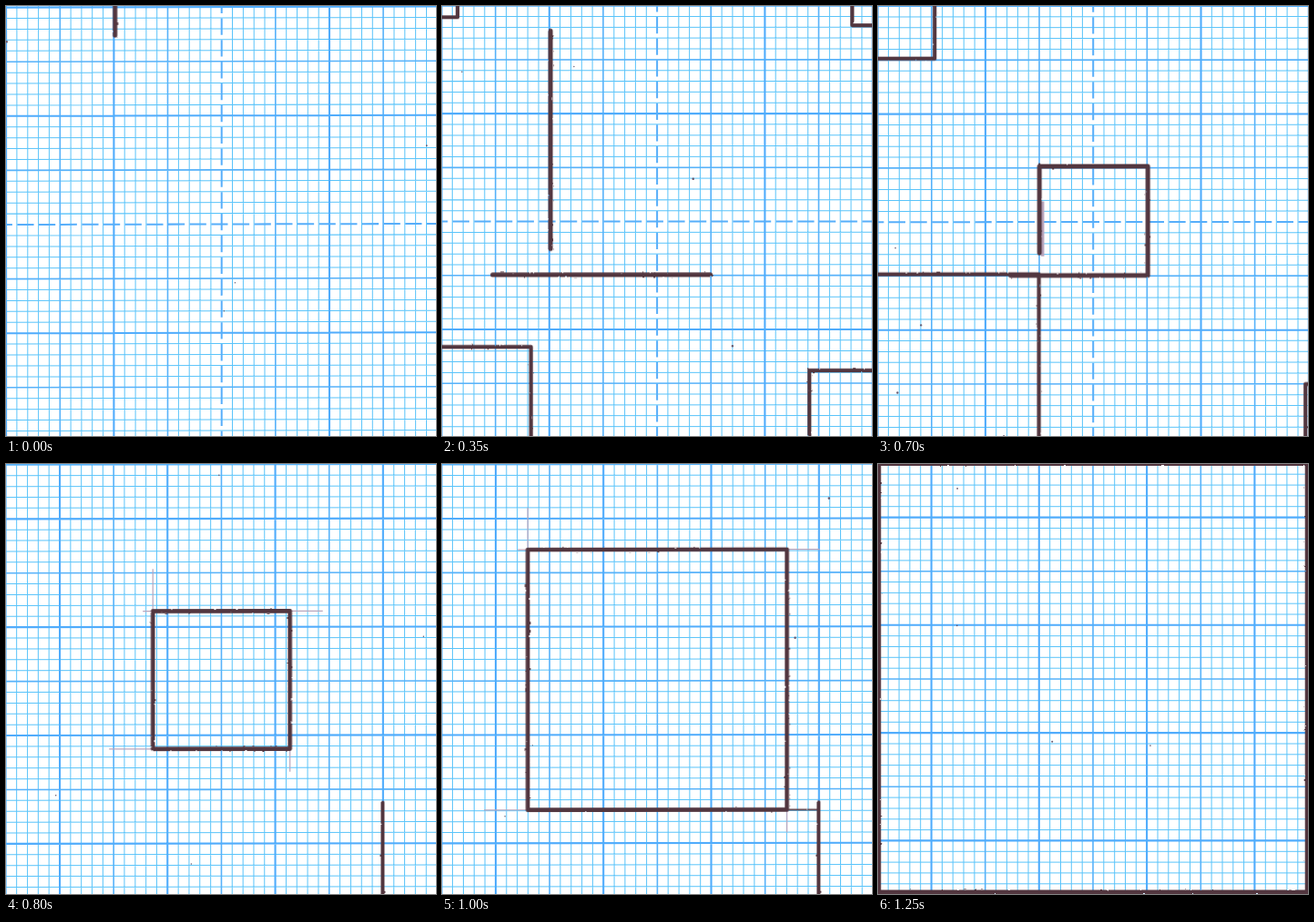
Write an HTML page that moves like this. It is 472x472 px and loops after 1300 ms.

```html
<!DOCTYPE html>
<html lang="en">
<head>
<meta charset="utf-8">
<title>Graph paper squares</title>
<style>
html, body { margin: 0; width: 100%; height: 100%; overflow: hidden; background: #fff; }
svg { display: block; width: 100vw; height: 100vh; }
path { fill: none; }
#ink path { stroke: #52363f; stroke-linecap: round; stroke-linejoin: round; }
#pencil path { stroke: #b9a6bd; }
</style>
</head>
<body>
<svg viewBox="0 0 472 472">
  <defs>
    <filter id="rough" filterUnits="userSpaceOnUse" x="-10" y="-10" width="492" height="492" color-interpolation-filters="sRGB">
      <feTurbulence type="fractalNoise" baseFrequency=".2" numOctaves="2" seed="4"/>
      <feDisplacementMap in="SourceGraphic" scale="2" xChannelSelector="R" yChannelSelector="G"/>
    </filter>
  </defs>
  <rect width="472" height="472" fill="#fff"/>
  <g id="page">
    <g id="dashedPaper"></g>
    <g id="plainPaper"></g>
    <g id="pencil">
      <path id="ghost" stroke-width="3.5"/>
      <path id="guides" stroke-width="1.2"/>
    </g>
    <g id="dust" fill="#66586e"></g>
    <g id="ink" filter="url(#rough)">
      <path id="snakes" stroke-width="5"/>
      <path id="corners" stroke-width="4.2"/>
      <path id="strays" stroke-width="4"/>
      <path id="link" stroke-width="1.8"/>
      <path id="box" stroke-width="4.6"/>
    </g>
  </g>
</svg>
<script>
const $ = id => document.getElementById(id);
const setPath = (id, d) => $(id).setAttribute('d', d);
const CELL = 11.83, LOOP = 1300, MID = 236;
const CLOSED = 14;   // step at which the snakes have closed the square
const LOW = 294.5, HIGH = 175, LEFT = 119, INNER = 177, RIGHT = 296;
const BODY = 239;    // length of one snake

// Piecewise linear value; keys are [step, value].
function at(keys, k) {
  for (let i = 1; i < keys.length; i++) {
    const [a, u] = keys[i - 1], [b, v] = keys[i];
    if (k <= b) return u + (v - u) * (k - a) / (b - a);
  }
  return keys[keys.length - 1][1];
}

function random(seed) {
  return () => {
    seed = (seed * 16807 + 11) % 2147483647;
    return seed / 2147483647;
  };
}

const stroke = (d, color, width, extra = '') =>
  `<path d="${d}" stroke="${color}" stroke-width="${width}" ${extra}/>`;

// Every fifth line is heavier, every tenth heaviest; phase picks which.
function paper(phase, dashed) {
  const d = { thin: '', medium: '', strong: '', dash: '' };
  for (let i = -22; i <= 22; i++) {
    const p = (MID + i * CELL).toFixed(1);
    const kind = dashed && i === 0 ? 'dash'
      : i % 5 ? 'thin'
      : (i + phase) % 10 ? 'medium' : 'strong';
    d[kind] += `M${p} -12V484M-12 ${p}H484`;
  }
  return stroke(d.thin, '#5ac4fa', 1) +
    stroke(d.medium, '#57b2fa', 1.6) +
    stroke(d.strong, '#50acfc', 2.1) +
    stroke(d.dash, '#57aefa', 2, 'stroke-dasharray="18.2 5.46"');
}
$('dashedPaper').innerHTML = paper(0, true);
$('plainPaper').innerHTML = paper(5, false);

// How far the scanned sheet slips and stretches.
const drift = [[0, 1], [6, .15], [10, .6], [13, .3], [17, 1], [21, .1], [24, 0]];

function slip(k) {
  const d = at(drift, k);
  return `matrix(1 ${-.0022 * d} 0 ${1 + .0077 * d} ${.7 * d} ${2.2 * d})`;
}

// Part of a polyline between two distances.
function cut(pts, start, from, to) {
  let s = start, d = '';
  for (let i = 1; i < pts.length; i++) {
    const [x, y] = pts[i - 1], [u, v] = pts[i];
    const len = Math.hypot(u - x, v - y);
    const a = Math.max(from - s, 0) / len, b = Math.min(to - s, len) / len;
    if (a < b) {
      const p = f => `${x + (u - x) * f} ${y + (v - y) * f}`;
      d += (d ? 'L' : 'M' + p(a) + 'L') + p(b);
    }
    s += len;
  }
  return d;
}

// Two snakes share a track: one falls onto it, one comes in from the left.
const turn = [[RIGHT, LOW], [RIGHT, HIGH], [INNER, HIGH], [INNER, LOW]];
const down = [[LEFT, -400], [LEFT, LOW], ...turn];
const across = [[-400, LOW], ...turn];
const acrossStart = LOW - LEFT - 400;
const tailKeys = [[0, -209], [6, 27], [10, 143], [13, 321]];
const headKeys = [[0, 170], [6, 470], [10, 640], [13, 805]];

function drawSnakes(k) {
  const tail = at(tailKeys, k), head = at(headKeys, k);
  const joined = k >= 10;
  let d = '', ghost = '';
  if (k < CLOSED) {
    d = joined ? cut(down, -400, tail, head)
      : cut(down, -400, tail, tail + BODY) + cut(across, acrossStart, head - BODY, head);
    if (joined) ghost = cut(down, -400, head - 60, head);
  }
  setPath('snakes', d);
  setPath('ghost', ghost);
}

// Squares push in from the corners until the peak, then leave.
const PEAK = 10.4;
const corners = [
  { from: [-20, -20], tip: [127, 122], come: [25, 25], go: [-25, -25] },
  { from: [492, -20], tip: [371, 98], come: [-18, 17.5], go: [45, -45] },
  { from: [-20, 492], tip: [146, 193], come: [11, -41], go: [11.7, 38.5] },
  { from: [492, 492], tip: [313, 307], come: [-20.5, -21], go: [60, 41] }
];

function cornerPath({ from, tip, come, go }, k) {
  const dt = k - PEAK, speed = dt < 0 ? come : go;
  const [x, y] = tip.map((p, i) => p + speed[i] * dt);
  return `M${from[0]} ${y}H${x}V${from[1]}`;
}

// The closed square grows; stray lines peek in beside it and withdraw.
function drawBox(k) {
  const n = k - CLOSED;
  if (n < 0) return ['box', 'strays', 'link', 'guides'].forEach(id => setPath(id, ''));
  const half = 59.5 + n * (15.55 + .2 * n);
  const l = MID - half, r = MID + half, t = l - 1.2, b = r - 1.2;
  const away = Math.abs(k - 17), side = 297 + 36 * away;
  setPath('box', `M${l} ${t}H${r}V${b}H${l}Z`);
  setPath('strays', `M413 ${side}V492M297 ${-2.5 - 30 * away}h145`);
  setPath('link', side < b && r < 413 ? `M${r} ${b}H413` : '');
  setPath('guides', away < 3 ? `M${l} ${t}v-46M${l} ${t}h-11M${r} ${t}h36M${l} ${b}h-48M${r} ${b}v25` : '');
}

function specks(k) {
  const rnd = random(k * 977 + 31);
  return Array.from({ length: 4 }, () =>
    `<circle cx="${rnd() * 472}" cy="${rnd() * 472}" r="${.6 + rnd() * .7}"/>`).join('');
}

let last = -1;
function draw(k) {
  if (k === last) return;
  last = k;
  const plain = k > CLOSED;
  $('page').setAttribute('transform', slip(k));
  $('dashedPaper').setAttribute('display', plain ? 'none' : 'inline');
  $('plainPaper').setAttribute('display', plain ? 'inline' : 'none');
  $('ghost').setAttribute('transform', 'translate(3.5 3.5)');
  $('dust').innerHTML = specks(k);
  setPath('corners', plain ? '' : corners.map(c => cornerPath(c, k)).join(''));
  drawSnakes(k);
  drawBox(k);
}

// The first pose holds twice as long as the others.
function tick() {
  const t = performance.now() % LOOP;
  draw(Math.max(0, Math.floor(t / 50) - 1));
  requestAnimationFrame(tick);
}
tick();
</script>
</body>
</html>
```
